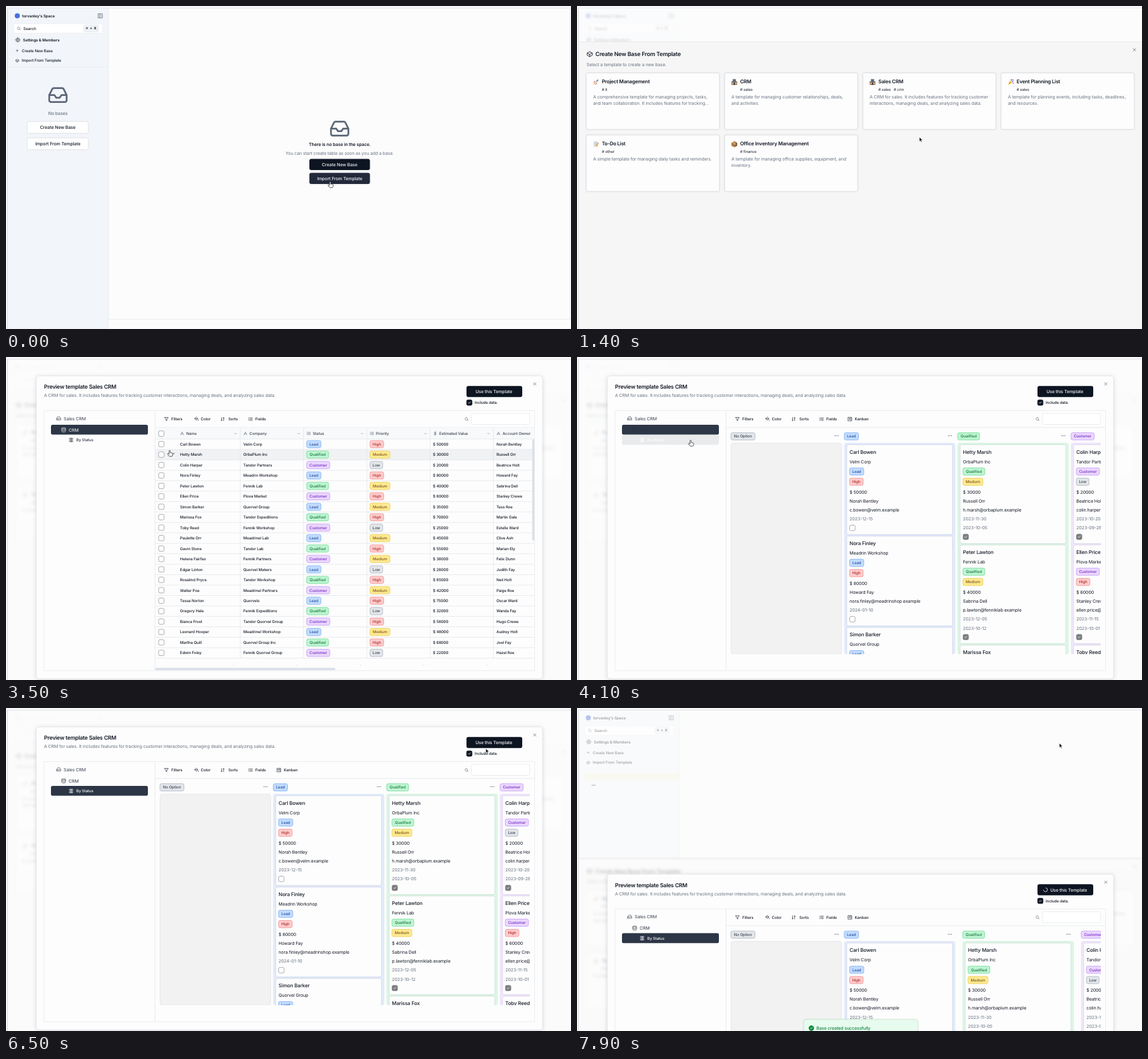
An HTML page for the animation above (8000 ms loop, 892 by 510 pixels).

```html
<!DOCTYPE html>
<html lang="en">
<head>
<meta charset="utf-8">
<title>Create a base from a template</title>
<style>
html, body { margin: 0; width: 100%; height: 100%; overflow: hidden; background: #fcfcfc; }
svg { display: block; width: 892px; height: 510px; }
text { font-family: Inter, Roboto, sans-serif; letter-spacing: -.015em; text-rendering: geometricPrecision; white-space: pre; }
.tight { letter-spacing: -.025em; }
.soft { filter: drop-shadow(0 .6px .8px #0f172a2e); }
.deep { filter: drop-shadow(0 1.5px 3px #0f172a28); }
</style>
</head>
<body>
<svg id="stage" viewBox="0 0 892 510"></svg>
<script>
const INK = '#141a26', GREY = '#687282', LINE = '#e3e6ea', DARK = '#0d1522', SLATE = '#2c3646';
const XS = 6.1, SM = 7;

// Drawing helpers; text is placed by its vertical centre.
const text = (x, y, s, size = XS, weight = 500, fill = INK, more = '') =>
  `<text x="${x}" y="${y + size * .36}" font-size="${size}" font-weight="${weight}" fill="${fill}" ${more}>${s}</text>`;
const mid = (x, y, s, size, weight, fill) => text(x, y, s, size, weight, fill, 'text-anchor="middle"');
const title = (x, y, s, size) => text(x, y, s, size, 600, INK, 'class="tight"');
const rect = (x, y, w, h, fill = 'none', stroke = 'none', r = 0, more = '') =>
  `<rect x="${x}" y="${y}" width="${w}" height="${h}" rx="${r}" fill="${fill}" stroke="${stroke}" stroke-width=".7" ${more}/>`;
const line = (x1, y1, x2, y2, c = LINE, w = .8) => `<path d="M${x1} ${y1}L${x2} ${y2}" stroke="${c}" stroke-width="${w}"/>`;
const path = (d, fill, more = '') => `<path d="${d}" fill="${fill}" ${more}/>`;
const group = (id, body, more = '') => `<g id="${id}" ${more}>${body}</g>`;

const ICONS = {
  inbox: 'M22 12h-6l-2 3h-4l-2-3H2M5.45 5.11 2 12v6a2 2 0 0 0 2 2h16a2 2 0 0 0 2-2v-6l-3.45-6.89A2 2 0 0 0 16.76 4H7.24a2 2 0 0 0-1.79 1.11z',
  box: 'M21 8 12 3 3 8v8l9 5 9-5zM3 8l9 5 9-5M12 13v8',
  gear: 'M12 4a8 8 0 1 0 .01 0M12 9a3 3 0 1 0 .01 0M12 1v3M12 20v3M1 12h3M20 12h3M4 4l2 2M18 18l2 2M20 4l-2 2M6 18l-2 2',
  plus: 'M12 4v16M4 12h16',
  panel: 'M3 3h18v18H3zM9 3v18M16 9l-3 3 3 3',
  search: 'M11 4a7 7 0 1 0 .01 0M16 16l5 5',
  close: 'M5 5l14 14M19 5 5 19',
  filter: 'M3 4h18l-7 9v7l-4-2v-5z',
  paint: 'M11 3 4 10l8 8 7-7zM4 10h14M21 16v3',
  sort: 'M7 4v16l-3-3M7 20l3-3M17 20V4l-3 3M17 4l3 3',
  list: 'M9 6h12M9 12h12M9 18h12M3 6h2M3 12h2M3 18h2',
  kanban: 'M3 3h18v18H3zM8 7v8M12 7v4M16 7v10',
  letter: 'M4 20 12 4l8 16M7 14h10',
  dollar: 'M17 6h-7a3 3 0 0 0 0 6h4a3 3 0 0 1 0 6H6M12 2v20',
  data: 'M3 5a9 3 0 0 0 18 0a9 3 0 0 0-18 0v14a9 3 0 0 0 18 0V5M3 12a9 3 0 0 0 18 0',
  drive: 'M3 13h18v6H3zM3 13l4-8h10l4 8M7 16h1',
  tree: 'M4 3h6v6H4zM14 3h6v6h-6zM4 15h6v6H4zM14 15h6v6h-6zM12 2v20',
  down: 'M6 9l6 6 6-6',
  expand: 'M14 4h6v6M20 4l-7 7M10 20H4v-6M4 20l7-7',
  check: 'M5 12l5 5 9-10'
};
const icon = (name, x, y, size = 7.5, color = INK, w = 2) =>
  `<path d="${ICONS[name]}" transform="translate(${x - size / 2} ${y - size / 2}) scale(${size / 24})" fill="none" stroke="${color}" stroke-width="${w}" stroke-linecap="round" stroke-linejoin="round"/>`;

const BADGES = {
  'Lead': [22.5, '#c3dcfd', '#6ea8f7', '#2450a8'],
  'Qualified': [34.5, '#bff5d2', '#5dd98c', '#1c7a43'],
  'Customer': [36.5, '#ead8fe', '#c08df8', '#7a2bc4'],
  'High': [21.5, '#fdcdcd', '#f48080', '#b02a2a'],
  'Medium': [31.5, '#fdea92', '#ecc53a', '#80591a'],
  'Low': [20, '#e3e6ea', '#a3abb6', '#3c4654'],
  'No Option': [38, '#e3e6ea', '#a3abb6', '#3c4654']
};
const badge = (x, y, name) => {
  const [w, fill, edge, ink] = BADGES[name];
  return rect(x, y - 5.7, w, 11.4, fill, edge, 2.4) + mid(x + w / 2, y, name, XS, 500, ink);
};
const tick = (x, y, on, fill = '#7b7d80') => on
  ? rect(x - 4.3, y - 4.3, 8.6, 8.6, fill, fill, 2) + icon('check', x, y, 6, '#fff', 3)
  : rect(x - 4.3, y - 4.3, 8.6, 8.6, '#fff', '#858b94', 2);

// Page behind everything
function page() {
  const button = (x, y, s, fill, ink) => rect(x, y, 95.5, 17.5, fill, 'none', 3, 'class="soft"') + mid(x + 47.8, y + 8.7, s, SM, 500, ink);
  return rect(3, 3, 158.5, 507, '#f2f5f9') + line(161.5, 3, 161.5, 510) + line(3, 3.5, 892, 3.5)
    + `<circle cx="17.8" cy="15.5" r="4" fill="#4a6ee0"/>` + text(25.5, 15.5, 'torvanley\'s Space', XS, 600)
    + icon('panel', 149, 15.5, 8.5, '#4b5563')
    + rect(12, 28, 140.5, 15, '#fff', '#e8ebef', 3) + icon('search', 20.3, 35.5, 7, '#4b5563') + text(27.3, 35.5, 'Search', 6.2)
    + rect(122.5, 30, 23.5, 10.8, '#eff2f6', '#dfe3e8', 2)
    + text(134.3, 35.4, '⌘ + K', 5.6, 600, INK, 'text-anchor="middle" style="font-family:\'DejaVu Sans Mono\',monospace;letter-spacing:0"')
    + icon('gear', 18.6, 53.5, 8) + text(26.8, 53.5, 'Settings &amp; Members', XS, 600)
    + icon('plus', 17.7, 70.4, 5.5) + text(25, 70.4, 'Create New Base')
    + icon('box', 17.7, 86.3, 6) + text(25, 86.3, 'Import From Template')
    + line(3, 96.5, 161, 96.5, '#e9ecf0')
    + group('empty', icon('inbox', 82, 140.7, 33, '#5b6778') + mid(82, 169.5, 'No bases', SM, 500, GREY)
      + button(34, 183, 'Create New Base', '#fff', INK) + button(34, 208.7, 'Import From Template', '#fff', INK)
      + icon('inbox', 526.8, 193.5, 33, '#5b6778')
      + mid(526.8, 218, 'There is no base in the space.', SM, 600, INK)
      + mid(526.8, 232.3, 'You can start create table as soon as you add a base.', SM, 400, GREY)
      + button(479, 241.5, 'Create New Base', DARK, '#eef1f5') + button(479, 263.5, 'Import From Template', '#22293a', '#eef1f5')
      + line(162, 494.5, 892, 494.5) + line(890.5, 3, 890.5, 494))
    + group('bases', rect(10, 102.5, 150, 12, '#f7f3de') + line(23, 122, 29.5, 122, '#555', 1.2));
}

// Template sheet
const PICTURES = {
  rocket: path('M2-4.5Q5-5 4.5-2L0 2-2 0z', '#c9ced6') + path('M-2 0-4.5 1-2-2zM0 2-1 4.5 2 2z', '#d3473c')
    + path('M-2 .5-4.5 4.5-.5 2z', '#f2a33c') + `<circle cx="2" cy="-2.2" r="1" fill="#4b7fb5"/>`,
  office: path('M-4.5-1h9v5.5h-9z', '#8a6f5c') + path('M-2.5-4.5h5V0h-5z', '#566b80') + path('M-3.5 1h2v2h-2zM1.5 1h2v2h-2z', '#e8d9a8') + path('M-1 1.5h2v3h-2z', '#3d3a3c'),
  party: path('M-4.5 4.5-1.5-2 2 1.5z', '#e9b23c') + path('M0-4.5h1.5V-2H0zM3 1h1.5v1.5H3z', '#d2504a') + path('M2.5-4h2v1.5h-2zM1.5-1.5 4-1v1H1.5z', '#6a62c8'),
  memo: path('M-4-4.5h7v9h-7z', '#e3e5e8') + path('M-2.5-2.5h4v.6h-4zM-2.5-.5h4v.6h-4zM-2.5 1.5h3v.6h-3z', '#8c929b') + path('M4.5-1.5 1 3.5-.5 4l.3-1.5L3.5-2.5z', '#e0953a'),
  parcel: path('M0-4.5 4.5-2.3v5L0 4.8l-4.5-2.1v-5z', '#b07d48') + path('M0-.2 4.5-2.3v5L0 4.8z', '#8b5f33') + path('M-2.8-3.2 1.7-1v2.5l-1.2.6V-.4l-4.4-2.2z', '#e2c08a')
};
const CARDS = [
  ['rocket', 'Project Management', '# it', 'A comprehensive template for managing projects, tasks,', 'and team collaboration. It includes features for tracking...'],
  ['office', 'CRM', '# sales', 'A template for managing customer relationships, deals,', 'and activities.'],
  ['office', 'Sales CRM', '# sales   # crm', 'A CRM for sales. It includes features for tracking customer', 'interactions, managing deals, and analyzing sales data.'],
  ['party', 'Event Planning List', '# sales', 'A template for planning events, including tasks, deadlines,', 'and resources.'],
  ['memo', 'To-Do List', '# other', 'A simple template for managing daily tasks and reminders.', ''],
  ['parcel', 'Office Inventory Management', '# finance', 'A template for managing office supplies, equipment, and', 'inventory.']
];
function sheet() {
  const cards = CARDS.map(([pic, name, tag, a, b], i) => {
    const x = 15 + i % 4 * 218.3, y = i < 4 ? 106 : 204;
    return rect(x, y, 209.5, 88.5, '#fdfdfd', '#e4e7eb', 1.5, 'class="soft"')
      + `<g transform="translate(${x + 15} ${y + 14})">${PICTURES[pic]}</g>`
      + title(x + 24.2, y + 13.5, name, 7.9) + text(x + 24.2, y + 25.6, tag, 6, 500, '#333b48')
      + text(x + 10.4, y + 37.2, a, SM, 400, GREY) + text(x + 10.4, y + 47.4, b, SM, 400, GREY);
  });
  return rect(3, 56.5, 889, 460, '#f6f6f6') + line(3, 56.5, 892, 56.5, '#e4e6e8')
    + icon('box', 20, 76, 10.5) + title(29, 76, 'Create New Base From Template', 9)
    + text(15, 92, 'Select a template to create a new base.', SM, 400, GREY)
    + icon('close', 880, 69, 7, '#444') + cards.join('');
}

// Records shared by the grid and the board
const split = s => s.split(',');
const names = split('Carl Bowen,Hetty Marsh,Colin Harper,Nora Finley,Peter Lawton,Ellen Price,Simon Barker,Marissa Fox,Toby Reed,Paulette Orr,Gavin Stone,Helena Fairfax,Edgar Linton,Rosalind Pryce,Walter Poe,Tessa Norton,Gregory Hale,Bianca Frost,Leonard Hooper,Martha Quill,Edwin Foley');
const firms = split('Velm Corp,OrbaPlum Inc,Tandor Partners,Meadrin Workshop,Fennik Lab,Plova Market,Quorvel Group,Tandor Expeditions,Fennik Workshop,Meadrinel Lab,Tandor Lab,Fennik Partners,Quorvel Makers,Tandor Workshop,Meadrinel Partners,Quorvels,Fennik Expeditions,Tandor Quorvel Group,Meadrinel Workshop,Quorvel Group Inc,Fennik Quorvel Group');
const owners = split('Norah Bentley,Russell Orr,Beatrice Holt,Howard Fay,Sabrina Dell,Stanley Crewe,Tess Roe,Martin Gale,Estelle Ward,Clive Ash,Marian Ely,Felix Dunn,Judith Fay,Neil Holt,Paige Roe,Oscar Ward,Wanda Fay,Hugo Crewe,Audrey Holt,Joel Fay,Hazel Roe');
const worth = split('50,30,20,80,40,60,35,70,25,45,55,38,28,65,42,75,32,58,48,68,22');
const mails = split('c.bowen@velm.example,h.marsh@orbaplum.example,colin.harper@tandor.example,nora.finley@meadrinshop.example,p.lawton@fenniklab.example,ellen.price@plova.example');
const dates = ['2023-12-15', '2023-11-30 2023-10-05', '2023-10-20 2023-09-28', '2024-01-10', '2023-12-05 2023-10-12', '2023-11-15 2023-10-01'];
const status = i => ['Lead', 'Qualified', 'Customer'][i % 3];
const priority = i => ({ H: 'High', M: 'Medium', L: 'Low' })['HMLHMHMHLMHMLHMHLHMHL'[i]];

const ROW = 16.48, TOP = 129.4;
function grid() {
  const heads = [['letter', 'Name'], ['letter', 'Company'], ['list', 'Status'], ['list', 'Priority'], ['dollar', 'Estimated Value'], ['letter', 'Account Owner']];
  let out = rect(235.5, 111.5, 599, 18, '#f8f9fa')
    + rect(235.5, TOP, 599, ROW, '#f0f2f4', 'none', 0, 'id="hover"') + tick(245.3, 121, false);
  heads.forEach(([pic, s], k) => {
    const x = 270 + k * 99.9;
    out += icon(pic, x + 8, 120.7, 7, '#555f6d') + text(x + 14.4, 120.5, s, XS, 500, '#3a4350');
    if (k) out += line(x, 111.5, x, 476);
    if (k < 5) out += icon('down', x + 92.3, 121, 5.5, '#555f6d') + text(x + 89, 486, ':', 5, 500, '#888');
  });
  names.forEach((name, i) => {
    const y = 137.6 + i * ROW;
    out += line(235.5, TOP + i * ROW, 834, TOP + i * ROW) + tick(245.3, y, false)
      + text(274.8, y, name) + text(374.7, y, firms[i]) + badge(474.7, y, status(i)) + badge(574.7, y, priority(i))
      + text(674, y, `$ ${worth[i]}000`) + text(774.2, y, owners[i]);
  });
  return `<g clip-path="url(#paneClip)">${out}` + group('expander', icon('expand', 263, 137.6, 6.5, '#4b5563'))
    + line(235.5, 475.6, 834, 475.6) + rect(236, 490.8, 284, 3.6, '#d9e0ea', 'none', 1.5) + rect(830.8, 130, 3.4, 160, '#d9e0ea', 'none', 1.5) + '</g>';
}

function card(x, y, i) {
  const days = dates[i] ? dates[i].split(' ') : [];
  const rows = [`$ ${worth[i]}000`, owners[i], mails[i] || '', ...days];
  const rowY = n => y + 74 + n * 14.2;
  return rect(x + 4.3, y, 166, 126.5 + days.length * 14.2, '#fdfdfd', 'none', 2, 'class="soft"')
    + text(x + 8.3, y + 11, names[i], 7.9, 500) + text(x + 8.3, y + 26, firms[i], SM, 400)
    + badge(x + 8.3, y + 41.8, status(i)) + badge(x + 8.3, y + 58, priority(i))
    + rows.map((s, n) => text(x + 8.3, rowY(n), s, SM, 400, n > 2 ? GREY : INK)).join('')
    + tick(x + 12.8, rowY(rows.length), days.length > 1);
}
function board() {
  const column = (k, name, fill, edge) => {
    const x = 243 + k * 179;
    let out = badge(x, 125.3, name) + text(x + 163, 124.6, '···', 8, 700, '#4b5563') + rect(x + .3, 136, 174.5, 333, fill, edge, 3);
    if (k) [0, 1, 2].forEach(n => out += card(x, 139 + n * (k > 1 ? 158.2 : 144.2), k - 1 + n * 3));
    return group('col' + k, out);
  };
  return icon('kanban', 431, 98, 7.5) + text(438.5, 98, 'Kanban')
    + `<g clip-path="url(#boardClip)">${column(0, 'No Option', '#f2f2f2', '#dfe1e4')}${column(1, 'Lead', '#e4ecfb', '#d7e3fa')}${column(2, 'Qualified', '#e0f6e8', '#c8efd6')}${column(3, 'Customer', '#f0e8fc', '#e4d6fa')}</g>`;
}

// Template preview
function dialog() {
  const tool = (pic, x, tx, s) => icon(pic, x, 98, 7.8) + text(tx, 98, s);
  return rect(48, 30, 799, 478, '#fdfdfd', '#e4e6ea', 4, 'class="deep"')
    + title(60, 47.2, 'Preview template Sales CRM', 8.7)
    + text(60, 60.6, 'A CRM for sales. It includes features for tracking customer interactions, managing deals, and analyzing sales data.', SM, 400, GREY)
    + icon('close', 834.8, 42.5, 7, '#444')
    + rect(727, 45.7, 88, 17.6, DARK, 'none', 3) + text(741.3, 54.5, 'Use this Template', SM, 500, '#f1f3f6', 'id="use"')
    + group('spinner', path('M0-3.1A3.1 3.1 0 1 1-3.1 0', 'none', 'stroke="#f1f3f6" stroke-width=".8"'))
    + tick(731.5, 72, true, DARK) + text(740, 72, 'Include data.')
    + rect(60, 84.7, 774.5, 410.5, 'none', LINE) + line(235.2, 84.7, 235.2, 495) + line(235.2, 111.3, 834.5, 111.3)
    + icon('drive', 83.2, 97, 8.5, '#4b5563') + text(91, 97, 'Sales CRM', SM, 400, '#38414e')
    + rect(71, 107, 153, 15.6, SLATE, 'none', 2.5, 'id="pickCrm"') + rect(71, 123, 153, 15.6, SLATE, 'none', 2.5, 'id="pickStatus"')
    + ['Light', 'Dark'].map(m => {
      const c = m === 'Light' ? '#fff' : '#2b3442';
      return group('crm' + m, icon('data', 91, 115, 8, c) + text(99, 115, 'CRM', SM, 400, c))
        + group('status' + m, icon('tree', 103, 131, 7.5, c) + text(111, 131, 'By Status', XS, 500, c));
    }).join('')
    + tool('filter', 253.3, 261, 'Filters') + tool('paint', 300.5, 307.5, 'Color') + tool('sort', 342, 351, 'Sorts') + tool('list', 386, 393.5, 'Fields')
    + icon('search', 727, 98, 7, '#4b5563') + rect(734.7, 89.2, 92, 17.3, '#fff', LINE, 3)
    + group('grid', grid()) + group('board', board());
}

const toast = rect(358, 492, 180, 27, '#e7fbee', '#c9f1d7', 4, 'class="soft"')
  + '<circle cx="370" cy="505.5" r="4.2" fill="#128a3e"/>' + icon('check', 370, 505.5, 6, '#fff', 3)
  + text(378, 505.5, 'Base created successfully', SM, 500, '#168043');

document.getElementById('stage').innerHTML =
  '<clipPath id="boardClip"><path d="M242 112H827V469.3H242z"/></clipPath><clipPath id="paneClip"><path d="M235 111H834.2V495H235z"/></clipPath>'
  + group('page', page()) + rect(3, 4, 889, 506, '#fdfdfd', 'none', 0, 'id="veil"')
  + group('sheet', sheet()) + group('veil2', rect(3, 4, 889, 506, '#fdfdfd') + line(3, 4, 892, 4))
  + group('dialog', dialog()) + group('toast', toast)
  + rect(0, 0, 892, 3, '#f8f9f9') + rect(0, 0, 2, 510, '#f8f9f9') + line(2, 3, 892, 3, '#e6e8ea') + line(2.4, 3, 2.4, 510, '#d5d8db', 1)
  + group('cursor', group('hand', path('M-1 .8q0-.9.9-.9t.9.9v2.6l2.4.5q1.6.4 1.4 2l-.5 2.4q-.2 1-1.2 1h-3q-.8 0-1.3-.7l-2-2.8q-.4-.9.5-1.1.6 0 1.9 1.2z', '#fff', 'stroke="#2b2d33" stroke-width=".8"'))
    + group('arrow', path('M0 0v7l1.6-1.5 1.1 2.4 1.2-.5-1.1-2.4H5z', '#111', 'stroke="#fff" stroke-width=".5"')));

const el = {};
document.querySelectorAll('[id]').forEach(n => el[n.id] = n);
const show = (n, on) => n.style.display = on ? '' : 'none';
const move = (n, x, y, more = '') => n.setAttribute('transform', `translate(${x} ${y})${more}`);
const blur = (n, px) => n.style.filter = px > .05 ? `blur(${px}px)` : 'none';
const ramp = (t, start, length) => {
  const p = Math.min(1, Math.max(0, (t - start) / length));
  return p * p * (3 - 2 * p);
};

// time, x, y of the pointer tip
const PATH = [[0, 512, 277.5], [1000, 512, 277.5], [1400, 540.5, 207], [1700, 541, 165], [1900, 541, 165], [2300, 500, 170],
  [2600, 453.5, 184.5], [3000, 450, 184], [3700, 182, 133], [4100, 179.5, 131.5], [4700, 179.5, 131.5], [5500, 479, 264],
  [6050, 482, 262], [6500, 757.5, 64], [6700, 761.5, 55.5], [8000, 761.5, 55.5]];
function pointer(t) {
  const i = Math.max(1, PATH.findIndex(p => p[0] >= t));
  const [t0, x0, y0] = PATH[i - 1], [t1, x1, y1] = PATH[i];
  const p = (t - t0) / (t1 - t0);
  return [x0 + (x1 - x0) * p, y0 + (y1 - y0) * p];
}

const LOOP = 8000, STEP = 100, BOARD = 4000, CLICK = 7100, CLOSE = 7770;
function render(t) {
  const open = ramp(t, 150, 500), shut = ramp(t, CLOSE, 300);
  const pop = ramp(t, 1850, 200), pick = ramp(t, 4070, 160);
  const closing = t >= CLOSE;

  show(el.empty, t < 1000);
  show(el.bases, t >= 1000);
  blur(el.page, Math.max(0, open * (1.5 + pop) * (1 - shut * 2.1)));
  el.veil.style.opacity = .8 * open * (1 - shut * .6);
  move(el.sheet, 0, 453.5 * (1 - open + shut));
  blur(el.sheet, pop * 2);
  el.veil2.style.opacity = .8 * pop * (1 - shut * .2);
  move(el.veil2, 0, closing ? 52.5 + 453.5 * shut : 0);

  const zoom = .95 + .05 * pop;
  show(el.dialog, pop > 0);
  el.dialog.style.opacity = pop;
  move(el.dialog, 447.5 * (1 - zoom), 269 * (1 - zoom) + 580.5 * shut, ` scale(${zoom})`);
  show(el.grid, t >= 2200 && t < BOARD);
  show(el.board, t >= BOARD);
  el.pickCrm.style.opacity = 1 - pick * pick;
  el.pickStatus.style.opacity = pick;
  const chosen = t >= BOARD;
  show(el.crmLight, !chosen);
  show(el.crmDark, chosen);
  show(el.statusLight, chosen);
  show(el.statusDark, !chosen);
  move(el.col2, closing ? 8 : 0, 0);
  move(el.col3, closing ? 16 : 0, 0);

  const busy = t >= CLICK;
  show(el.spinner, busy);
  el.use.setAttribute('x', busy ? 747.3 : 741.3);
  move(el.spinner, 739.7, 54.5, ` rotate(${(t - 7900) * .36})`);
  show(el.toast, t > 7800);
  move(el.toast, 0, 28 * (1 - ramp(t, 7800, 100)));

  // The grid highlights a row a little after the pointer reaches it.
  const [hx, hy] = pointer(Math.max(0, t - 150));
  const row = Math.floor((hy - TOP) / ROW);
  const over = hx > 236 && row >= 0;
  show(el.hover, over);
  show(el.expander, over);
  move(el.hover, 0, row * ROW);
  move(el.expander, 0, row * ROW);

  const [x, y] = pointer(t);
  const onSheet = t > 450 && t < 1700 && y > 195;
  const aboveBoard = t >= 6100 && y > 63;
  const arrow = onSheet || aboveBoard || busy;
  show(el.arrow, arrow);
  show(el.hand, !arrow);
  move(el.cursor, x, y);
}

function loop() {
  const t = performance.now() % LOOP;
  render(Math.floor(t / STEP) * STEP);
  requestAnimationFrame(loop);
}
loop();
</script>
</body>
</html>
```
